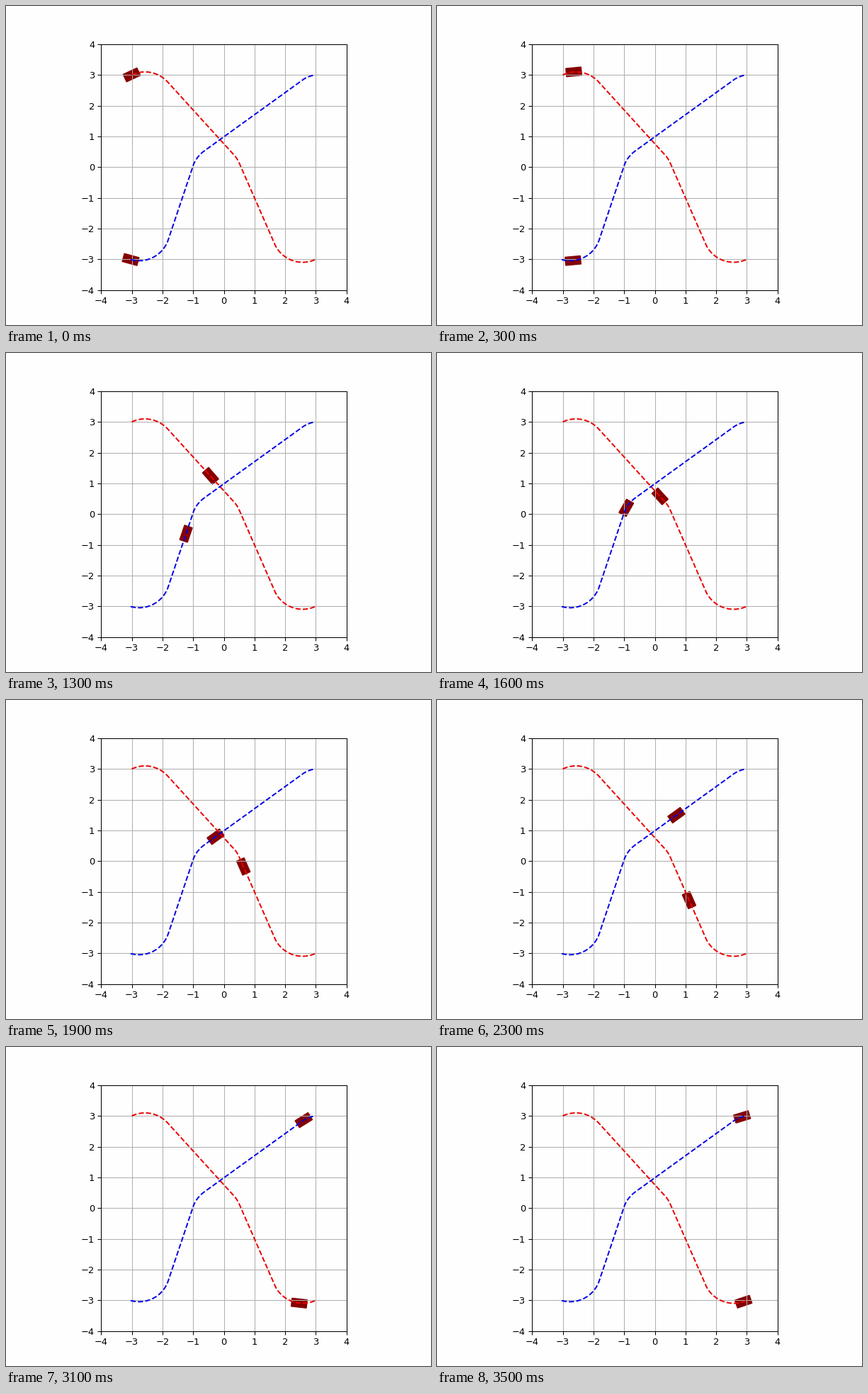
A matplotlib script for the animation above (3.6 s loop, 600 by 450 pixels).

```python
import numpy as np
import matplotlib.pyplot as plt
from matplotlib.animation import FuncAnimation
from matplotlib.patches import Rectangle

FRAMES, INTERVAL = 36, 100
LENGTH, WIDTH = 0.5, 0.27
SPEED, RAMP, STOP_GAP = 0.299, 3.6, 0.12

# Unit-radius turns: centre, side (1 right, -1 left), heading in and out.
# Straight lines join one turn to the next.
RED_TURNS = [(-2.57, 2.1, 1, 25.5, -48),
             (-0.414, -0.267, 1, -48, -66),
             (2.57, -2.1, -1, -66, 25.5)]
BLUE_TURNS = [(-2.76, -2.05, -1, -16, 70),
              (-0.06, -0.29, 1, 70, 35),
              (3.134, 2.015, 1, 35, 10)]


def make_path(turns):
    """Return evenly spaced distances and the points of the path there."""
    arcs = []
    for cx, cy, side, start, end in turns:
        a = np.radians(np.linspace(start, end, 60))
        arcs.append([cx - side * np.sin(a), cy + side * np.cos(a)])
    x, y = np.hstack(arcs)
    dist = np.append(0, np.cumsum(np.hypot(np.diff(x), np.diff(y))))
    s = np.linspace(0, dist[-1], 800)
    return s, np.interp(s, dist, x), np.interp(s, dist, y)


def travelled(t, total):
    """Distance at time t: speed up, cruise, then brake to a stop."""
    stop = total / SPEED + RAMP
    sq = lambda u: np.maximum(u, 0) ** 2
    return SPEED / (2 * RAMP) * (sq(t) - sq(t - RAMP)
                                 - sq(t - stop + RAMP) + sq(t - stop))


def drive(path, swing):
    """Poses along the path, swinging wide as the car leaves the first bend."""
    s, x, y = path
    a = np.arctan2(np.gradient(y), np.gradient(x))
    wide = swing * np.exp(-((s - 1.85) / 0.75) ** 2)
    x, y = x - wide * np.sin(a), y + wide * np.cos(a)
    heading = np.degrees(np.arctan2(np.gradient(y), np.gradient(x)))
    d = travelled(np.arange(FRAMES), s[-1] - STOP_GAP)
    return np.column_stack([np.interp(d, s, v) for v in (x, y, heading)])


fig, ax = plt.subplots(figsize=(6.4, 4.8), dpi=93.75, facecolor="#fefefe")
ax.set_facecolor("#fefefe")
ax.set_aspect("equal")
ax.set(xlim=(-4, 4), ylim=(-4, 4), xticks=range(-4, 5), yticks=range(-4, 5))
ax.grid(True)

tracks, cars = [], []
for turns, color, swing in [(RED_TURNS, "#ea0000", 0.22),
                            (BLUE_TURNS, "#0000e6", 0)]:
    path = make_path(turns)
    ax.plot(path[1], path[2], "--", color=color)
    tracks.append(drive(path, swing))
    cars.append(ax.add_patch(Rectangle((0, 0), LENGTH, WIDTH, color="#850000",
                                       rotation_point="center")))


def update(step):
    for car, track in zip(cars, tracks):
        x, y, heading = track[step]
        car.set_xy((x - LENGTH / 2, y - WIDTH / 2))
        car.set_angle(heading)
    return cars


anim = FuncAnimation(fig, update, frames=FRAMES, interval=INTERVAL,
                     init_func=lambda: update(0), repeat=True, repeat_delay=0)
plt.show()
```
